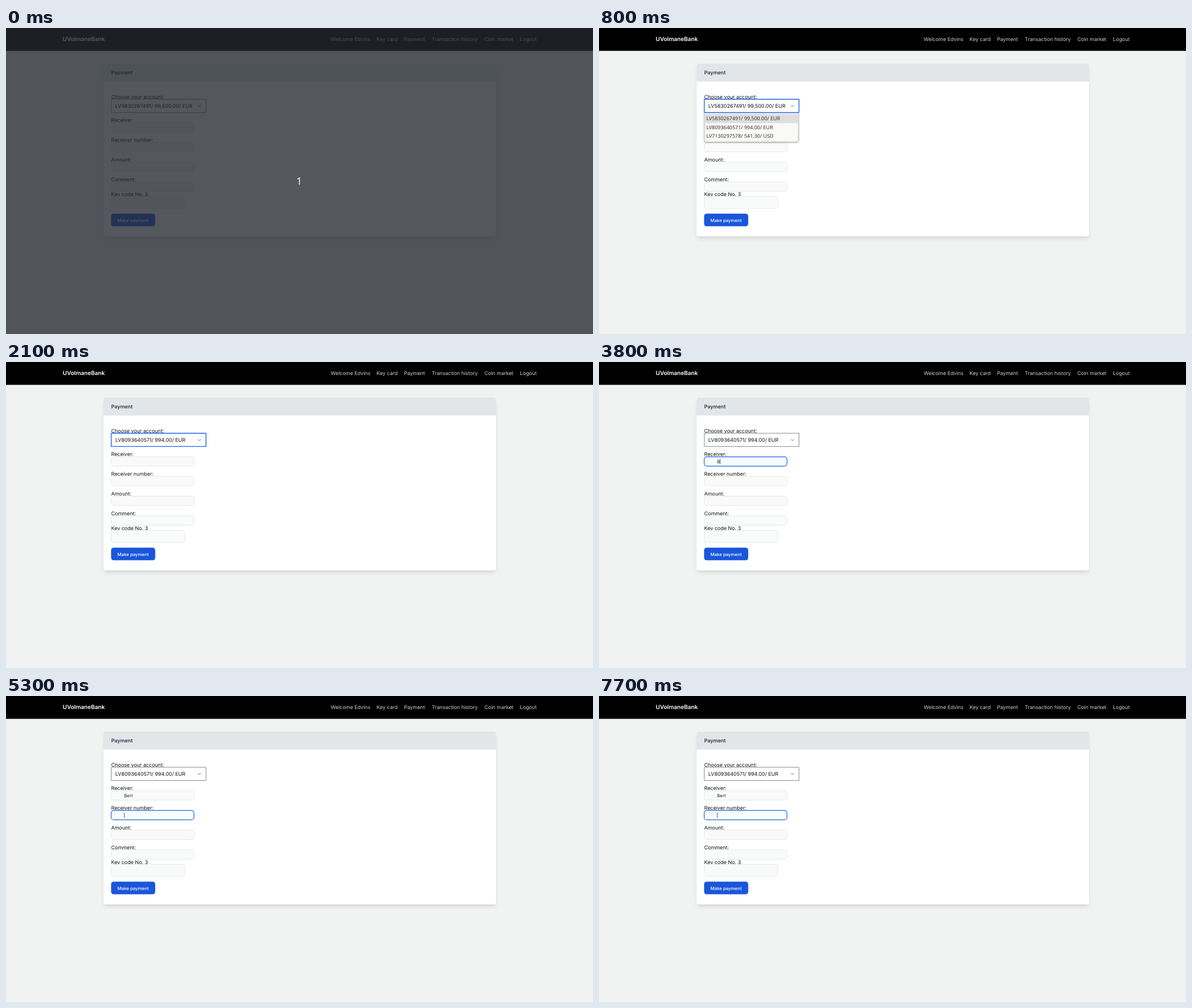
Animation, 1035 px wide and 541 px high, one loop 8000 ms. Source, as an HTML page with a canvas:

```html
<!DOCTYPE html>
<html lang="en">
<head>
<meta charset="utf-8">
<title>Payment form</title>
<style>
  html, body { margin: 0; width: 100%; height: 100%; overflow: hidden; background: #f1f3f3; }
  canvas { display: block; width: 1035px; height: 541px; }
</style>
</head>
<body>
<canvas id="stage" width="1035" height="541"></canvas>
<script>
const W = 1035, H = 541, LOOP = 8000;
const ctx = document.getElementById('stage').getContext('2d');

const UI = 'Inter, sans-serif';
const MENU = '"Noto Sans", sans-serif';
const BODY = 8.96, SMALL = 7.84;
const INK = '#101114', BLUE = '#1c64f2';

const NAME = 'Bert';
const ACCOUNTS = [
  'LV5830267491/ 99,500.00/ EUR',
  'LV8093640571/ 994.00/ EUR',
  'LV7130297578/ 541.30/ USD'
];
const NAV = [
  ['Welcome Edvins', 572.6], ['Key card', 653.3], ['Payment', 701.7],
  ['Transaction history', 750.8], ['Coin market', 843.4], ['Logout', 906.2]
];
const FIELDS = [
  { label: 'Receiver:', base: 166.2, top: 167.6, w: 146, h: 16.5 },
  { label: 'Receiver number:', base: 201.1, top: 202.4, w: 146, h: 16.5 },
  { label: 'Amount:', base: 235.9, top: 237.2, w: 146, h: 16.5 },
  { label: 'Comment:', base: 270.7, top: 272, w: 146, h: 16.5 },
  { label: 'Key code No. 3', base: 296.6, top: 297.6, w: 130, h: 21.3 }
];
const LEFT = 185.5, TEXT_X = 208.2;

function text(str, x, y, color = INK, size = BODY, weight = 400, family = UI) {
  ctx.font = `${weight} ${size}px ${family}`;
  ctx.fillStyle = color;
  ctx.fillText(str, x, y);
}

function box(x, y, w, h, r, fill, stroke, line = 1) {
  ctx.beginPath();
  ctx.roundRect(x, y, w, h, r);
  if (fill) {
    ctx.fillStyle = fill;
    ctx.fill();
  }
  if (stroke) {
    ctx.strokeStyle = stroke;
    ctx.lineWidth = line;
    ctx.stroke();
  }
}

function shadowed(blur, dy, alpha, draw) {
  ctx.save();
  ctx.shadowColor = `rgba(0,0,0,${alpha})`;
  ctx.shadowBlur = blur;
  ctx.shadowOffsetY = dy;
  draw();
  ctx.restore();
}

function drawPage() {
  ctx.fillStyle = '#f1f3f3';
  ctx.fillRect(0, 0, W, H);
  ctx.fillStyle = '#000';
  ctx.fillRect(0, 0, W, 40.4);
  text('UVolmaneBank', 100, 23.1, '#fff', 10.08, 600);
  for (const [label, x] of NAV) text(label, x, 22.6, '#cdd1d6');

  shadowed(8.4, 5.6, 0.1, () => box(173.7, 64.7, 688.6, 302, 4, '#fefffe'));
  shadowed(3.4, 2.2, 0.06, () => box(173, 64, 690, 303.5, 4, '#fefffe'));
  box(172, 63, 692, 305.5, 4, '#fefffe');
  box(172, 63, 692, 31.4, [4, 4, 0, 0], '#e2e6e9');
  text('Payment', LEFT, 82, '#2b3541', BODY, 600);

  box(185.3, 328.2, 77.8, 22.3, 4.5, '#1a56db');
  text('Make payment', 196.4, 342.7, '#fff', SMALL, 500);
}

function drawSelect(value, focused) {
  text('Choose your account:', LEFT, 124.6);
  box(185.6, 126, 167, 23.4, 0, '#fefffe', focused ? BLUE : '#777c89', focused ? 1.4 : 0.9);
  text(value, 192.8, 141);
  ctx.beginPath();
  ctx.moveTo(338.3, 136.4);
  ctx.lineTo(341, 139.2);
  ctx.lineTo(343.7, 136.4);
  ctx.strokeStyle = '#6b7280';
  ctx.lineWidth = 1;
  ctx.stroke();
}

function drawCaret(x, y) {
  ctx.fillStyle = '#3c4048';
  ctx.fillRect(x, y, 0.8, 9.6);
}

function drawField(f, focused) {
  text(f.label, LEFT, f.base);
  box(LEFT, f.top, f.w, f.h, 4.5, '#f9fafa', focused ? BLUE : '#e1e5e5', focused ? 1.2 : 0.8);
}

function drawAccountMenu(active) {
  const rowH = 15.1, top = 153;
  shadowed(3, 1, 0.3, () => box(185.8, 150.8, 166, 50.4, [0, 0, 2, 2], '#f9f9f8', '#c6c8c8', 0.7));
  ctx.fillStyle = '#dddedd';
  ctx.fillRect(186.2, top + active * rowH, 165.3, rowH);
  ACCOUNTS.forEach((a, i) => text(a, 189.2, 163.4 + i * rowH, '#333635', BODY, 400, MENU));
}

function drawHints(names) {
  const rowH = 11.5;
  shadowed(2, 0.6, 0.3, () =>
    box(185.8, 185, 145.4, 6.3 + names.length * rowH, [0, 0, 2, 2], '#fefffe', '#c6c8c8', 0.7));
  names.forEach((n, i) => text(n, 189.3, 197.2 + i * rowH, '#1a1b1c', SMALL, 400, MENU));
}

function drawCountdown() {
  ctx.fillStyle = 'rgba(36,40,48,0.78)';
  ctx.fillRect(0, 0, W, H);
  text('1', 511.8, 277, '#f6f6f2', 18, 400, MENU);
}

function render(t) {
  const typed = NAME.slice(0, [3800, 4000, 4300, 4700].filter(k => t >= k).length);
  const focus = t < 700 ? '' : t < 2900 ? 'account' : t < 5300 ? 'receiver' : 'number';
  const caretOn = t < 6500 || t >= 7700;

  drawPage();
  drawSelect(ACCOUNTS[t < 2100 ? 0 : 1], focus === 'account');
  FIELDS.forEach((f, i) =>
    drawField(f, (i === 0 && focus === 'receiver') || (i === 1 && focus === 'number')));

  text(typed, TEXT_X, 178.9, '#1d2530', SMALL);
  const end = TEXT_X + ctx.measureText(typed).width;
  if (focus === 'receiver') drawCaret(end, 171.2);
  if (focus === 'number' && caretOn) drawCaret(TEXT_X, 206.2);

  if (t >= 800 && t < 2100) drawAccountMenu(t < 1500 ? 0 : 1);
  if (t >= 3900 && t < 5300) drawHints(t < 4100 ? [NAME, 'Bruno'] : [NAME]);
  if (t < 100) drawCountdown();
}

ctx.textRendering = 'geometricPrecision';
const start = performance.now();
function tick() {
  render((performance.now() - start) % LOOP);
  requestAnimationFrame(tick);
}
tick();
</script>
</body>
</html>
```
